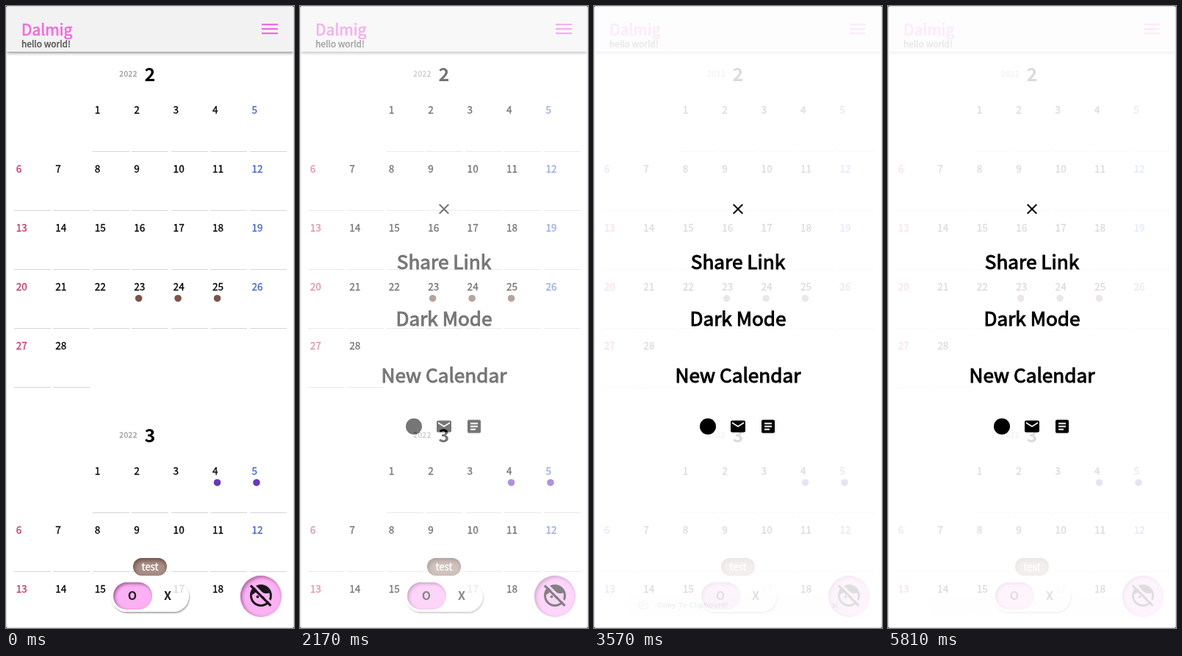
An HTML page that plays this animation: 392 px wide and 844 px high, repeating every 5880 ms.

```html
<!DOCTYPE html>
<html lang="en">
<head>
<meta charset="utf-8">
<title>Calendar</title>
<style>
html, body { margin: 0; width: 100%; height: 100%; overflow: hidden; background: #fff; }
body { position: relative; font-family: "Noto Sans CJK KR", "Noto Sans CJK JP", "Noto Sans CJK", "Noto Sans", sans-serif; }
div, svg { position: absolute; box-sizing: border-box; }
svg { left: 0; top: 0; width: 100%; height: 100%; }
#header { left: 1px; top: 0; width: 390px; height: 62px; background: #f2f2f2; box-shadow: 0 2px 4px rgba(0,0,0,.42); }
#tag { left: 173px; top: 749px; width: 46px; height: 24px; border-radius: 12px; background: #a88f87; box-shadow: inset 1px 3px 6px #6b4a3e; }
#toggle { left: 143px; top: 780px; width: 106px; height: 42px; border-radius: 21px; background: rgba(255,255,255,.85); box-shadow: 1px 2px 2px rgba(0,0,0,.32); }
#knob { left: 146px; top: 782px; width: 53px; height: 37px; border-radius: 19px; background: #fbb0f4; box-shadow: inset 2px 2px 4px rgba(110,40,100,.65); }
#fab { left: 319px; top: 773px; width: 56px; height: 56px; border-radius: 50%; background: #fbb2f3; box-shadow: inset 2px 2px 5px rgba(110,40,100,.6), 0 0 2px rgba(200,120,190,.5); }
#tap { left: 345px; top: 16px; width: 29px; height: 29px; border-radius: 2px; background: rgba(110,190,230,.7); }
#menu { inset: 0; }
#veil { inset: 0; background: rgba(255,255,255,.86); }
#toast { left: 9px; top: 789px; width: 374px; height: 48px; border-radius: 4px; background: #edf7ed; }
#frame { inset: 0; border: 1px solid #d8d8d8; border-radius: 3px; box-shadow: 0 0 0 3px #333; }
</style>
</head>
<body>
<div id="header"></div>
<svg id="calendar"></svg>
<div id="tag"></div><div id="toggle"></div><div id="knob"></div><div id="fab"></div>
<svg id="labels"></svg>
<div id="tap"></div>
<div id="menu"><div id="veil"></div><svg id="items"></svg></div>
<div id="toast"><svg id="note"></svg></div>
<div id="frame"></div>
<script>
const $ = id => document.getElementById(id);
const PINK = '#ee6be0';
const CLOSE = 'M19 6.41 17.59 5 12 10.59 6.41 5 5 6.41 10.59 12 5 17.59 6.41 19 12 13.41 17.59 19 19 17.59 13.41 12z';
const MAIL = 'M20 4H4c-1.1 0-1.99.9-1.99 2L2 18c0 1.1.9 2 2 2h16c1.1 0 2-.9 2-2V6c0-1.1-.9-2-2-2zm0 4-8 5-8-5V6l8 5 8-5v2z';
const ARTICLE = 'M19 3H5c-1.1 0-2 .9-2 2v14c0 1.1.9 2 2 2h14c1.1 0 2-.9 2-2V5c0-1.1-.9-2-2-2zm-5 14H7v-2h7v2zm3-4H7v-2h10v2zm0-4H7V7h10v2z';
const CHECK = 'M20 12A8 8 0 1 1 12 4C12.76 4 13.5 4.11 14.2 4.31L15.77 2.74C14.61 2.26 13.34 2 12 2A10 10 0 1 0 22 12M7.91 10.08 6.5 11.5 11 16 21 6 19.59 4.58 11 13.17z';
const FACE = 'M9 11.75a1.25 1.25 0 1 0 0 2.5 1.25 1.25 0 1 0 0-2.5zm6 0a1.25 1.25 0 1 0 0 2.5 1.25 1.25 0 1 0 0-2.5zM12 2C6.48 2 2 6.48 2 12s4.48 10 10 10 10-4.48 10-10S17.52 2 12 2zm0 18c-4.41 0-8-3.59-8-8 0-.29.02-.58.05-.86 2.36-1.05 4.23-2.98 5.21-5.37C11.07 8.33 14.05 10 17.42 10c.78 0 1.53-.09 2.25-.26.21.71.33 1.47.33 2.26 0 4.41-3.59 8-8 8z';

const text = (x, y, size, fill, str, more = '') =>
  `<text x="${x}" y="${y}" font-size="${size}" fill="${fill}" ${more}>${str}</text>`;
const mid = 'text-anchor="middle"', bold = 'font-weight="700"';
// A thin outline gives weights between regular and bold.
const heavy = (color, w) => `stroke="${color}" stroke-width="${w}"`;
const dot = (x, y, r, fill) => `<circle cx="${x}" cy="${y}" r="${r}" fill="${fill}"/>`;
const at = (x, y, size, body) =>
  `<g transform="translate(${x - size / 2} ${y - size / 2}) scale(${size / 24})">${body}</g>`;
const icon = (x, y, size, d, fill = '#000') => at(x, y, size, `<path d="${d}" fill="${fill}"/>`);

// Both months begin on a Tuesday.
function month(n, top, days, marks, color) {
  let out = text(154, top + 4, 10.4, '#a6a6a6', '2022', bold) +
            text(188.5, top + 10, 25, '#000', n, bold);
  for (let d = 1; d <= days; d++) {
    const col = (d + 1) % 7, y = top + 80 * Math.floor((d + 1) / 7), x = 11 + 53.45 * col;
    const fill = col == 0 ? '#c23b69' : col == 6 ? '#4768c6' : '#000';
    out += text(x + 2.8, y + 54, 13.6, fill, d, heavy(fill, .3)) +
      `<rect x="${Math.round(x)}" y="${y + 105}" width="50" height="1" fill="#d6d6d6"/>`;
    if (marks.includes(d)) out += dot(x + 9.3, y + 64.7, 4.8, color);
  }
  return out;
}

$('calendar').innerHTML =
  text(21, 40, 21, PINK, 'Dalmig', heavy(PINK, .7)) +
  text(21, 56, 12, '#555', 'hello world!', heavy('#555', .4)) +
  [24, 30, 36].map(y => `<rect x="348" y="${y}" width="22" height="2.2" fill="${PINK}"/>`).join('') +
  month(2, 92, 28, [23, 24, 25], '#795548') + month(3, 582, 19, [4, 5], '#673ab7');

$('labels').innerHTML =
  text(196, 766, 13.3, '#fff', 'test', mid + heavy('#fff', .3)) +
  text(172, 806, 16, '#222', 'O', mid + ' ' + bold) +
  text(220, 806, 16, '#222', 'X', mid + ' ' + bold) +
  at(347, 800, 36, `<path d="${FACE}" fill="#1c141b"/>
    <path d="M4.4 1.6 22.4 19.6" stroke="#fbb2f3" stroke-width="2"/>
    <path d="M2.6 2.9 21 21.3" stroke="#1c141b" stroke-width="2.1"/>`);

$('items').innerHTML = icon(196, 275.5, 24, CLOSE) +
  ['Share Link', 'Dark Mode', 'New Calendar'].map((s, i) =>
    text(196, 357 + 77 * i, 26.2, '#000', s, mid + ' ' + heavy('#000', 1))).join('') +
  dot(155, 570.5, 11, '#000') + icon(196, 570.5, 24, MAIL) + icon(237, 570.5, 24, ARTICLE);

$('note').innerHTML = icon(27, 24, 22, CHECK, '#4caf50') +
  text(50, 29, 14, '#1e4620', 'Copy To Clipboard!',
    'font-family="Roboto, sans-serif" font-weight="500" letter-spacing=".15"') +
  icon(351, 25, 20, CLOSE, '#1e4620');

// Cubic Bézier easing, solved by bisection.
function bezier(x1, y1, x2, y2) {
  const f = (a, b, u) => 3 * a * u * (1 - u) ** 2 + 3 * b * u * u * (1 - u) + u ** 3;
  return x => {
    if (x <= 0) return 0;
    if (x >= 1) return 1;
    let lo = 0, hi = 1;
    for (let i = 0; i < 24; i++) {
      const m = (lo + hi) / 2;
      if (f(x1, x2, m) < x) lo = m; else hi = m;
    }
    return f(y1, y2, lo);
  };
}
const ease = bezier(.25, .1, .25, 1), standard = bezier(.4, 0, .2, 1);

const LOOP = 5880, STEP = 70, OPEN = 2015, SHOW = 3537, HIDE = 5620;
const start = performance.now();

function draw() {
  const t = Math.floor(((performance.now() - start) % LOOP) / STEP) * STEP;
  $('menu').style.opacity = ease((t - OPEN) / 500);
  $('tap').style.opacity = t == 2100 ? 1 : 0;
  const fade = standard((t - SHOW) / 204) - standard((t - HIDE) / 204);
  const grow = standard((t - SHOW) / 136) - standard((t - HIDE - 68) / 136);
  $('toast').style.opacity = fade;
  $('toast').style.transform = `scale(${.75 + .25 * grow}, ${.5625 + .4375 * grow})`;
  requestAnimationFrame(draw);
}
draw();
</script>
</body>
</html>
```
